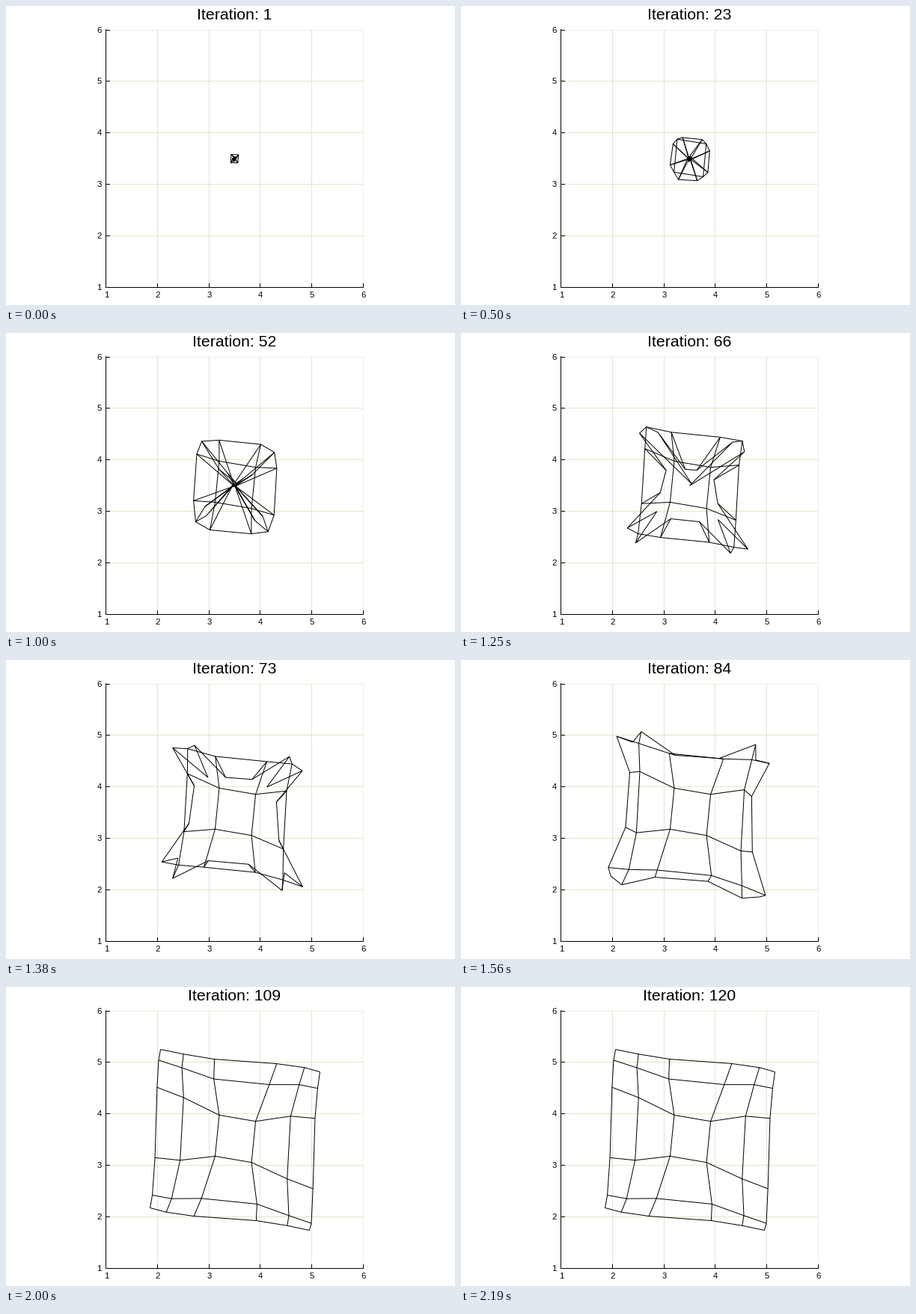
These frames come from a looping animation (600 px wide and 400 px high, 2.25 s). A matplotlib script:

```python
import numpy as np
import matplotlib.pyplot as plt
from matplotlib.animation import FuncAnimation
from matplotlib.collections import LineCollection

W, H, DPI = 600, 400, 100
LOOP_MS, TICK_MS, POSES = 2250, 10, 36
PX = 72 / DPI
FONT = "Liberation Sans"
LEFT, TOP, RIGHT, BOTTOM = 133, 31.5, 477, 376
CENTER = np.array([306, 204])
N = 6  # the map is an N x N mesh

# Mesh shape: rough grid lines, tilted, with the core pinched to the center
COLS = np.array([199, 225, 264, 348, 387, 412])
ROWS = np.array([98, 116, 154, 249, 297, 310])
side = np.linspace(-1, 1, N)
u, v = np.meshgrid(side, side)
grid_x, grid_y = np.meshgrid(COLS, ROWS)
pinch = 0.58 * np.exp(-4 * (u**2 + v**2))
final = np.stack([grid_x - (14 - 7 * u**2) * v + pinch * (CENTER[0] - grid_x),
                  grid_y + (21 - 6 * v**2) * u + pinch * (CENTER[1] - grid_y)],
                 axis=-1)
rng = np.random.default_rng(3)
seed = CENTER - (1, 0) + rng.normal(0, 1.2, (N, N, 2))

# Unfolding (start, duration) by how far a node is from the middle lines
UNFOLD = {(0, 0): (-2, 18), (1, 0): (3, 26), (1, 1): (8, 21),
          (2, 0): (17.5, 14), (2, 1): (14, 13), (2, 2): (19, 9.5)}
start, span = np.empty((2, N, N))
for i, j in np.ndindex(N, N):
    far = [int(abs(n - (N - 1) / 2)) for n in (i, j)]
    start[i, j], span[i, j] = UNFOLD[max(far), min(far)]
    if max(far) == 2:
        start[i, j] -= v[i, j]  # the lower rim leads


def pose(k):
    t = np.clip((k - start) / span, 0, 1)
    ease = (1 - (1 - t) ** 2)[..., None]
    return seed + (final - seed) * ease + 0.5


fig = plt.figure(figsize=(W / DPI, H / DPI), dpi=DPI, facecolor="white")
ax = fig.add_axes([0, 0, 1, 1])
ax.set_xlim(0, W)
ax.set_ylim(H, 0)
ax.axis("off")


def line(xs, ys, color="black", **kw):
    ax.plot(xs, ys, color=color, lw=PX, snap=False, **kw)


def label(x, y, text, size, **kw):
    return ax.text(x, y, text, family=FONT, size=size * PX,
                   va="baseline", **kw)


x0, x1 = LEFT + 0.5, RIGHT + 0.5
y0, y1 = BOTTOM + 0.5, int(TOP) + 0.5
for n in range(N):
    x = round(LEFT + n * (RIGHT - LEFT) / (N - 1)) + 0.5
    y = round(BOTTOM - n * (BOTTOM - TOP - 0.1) / (N - 1)) + 0.5
    y = max(y, y1)
    dots = dict(color="#e4e4cc" if n == N - 1 else "#cccc98",
                ls=(0, (1, 1)), dash_capstyle="butt", zorder=1)
    line([x, x], [y0, y1], **dots)
    line([x0, x1], [y, y], **dots)
    line([x, x], [y0, y0 - 5])
    line([x0, x0 + 5], [y, y])
    label(x + 0.5, 390.5, str(n + 1), 11.3, ha="center")
    label(127.5, y + 3.8, str(n + 1), 11.3, ha="right")
line([x0, x0, x1], [y1, y0, y0])

title = label(305.5, 18, "", 21.3, ha="center")
net = LineCollection([], colors="black", linewidths=PX, zorder=3)
ax.add_collection(net)


def draw(tick):
    k = int((tick + 0.5) * TICK_MS * POSES / LOOP_MS)
    p = pose(k)
    net.set_segments([*p, *p.transpose(1, 0, 2)])
    count = max(1, int(120 - 3.575 * (POSES - 1 - k)))
    title.set_text(f"Iteration: {count}")
    return net, title


anim = FuncAnimation(fig, draw, frames=LOOP_MS // TICK_MS, interval=TICK_MS,
                     repeat=True, repeat_delay=0)
plt.show()
```
